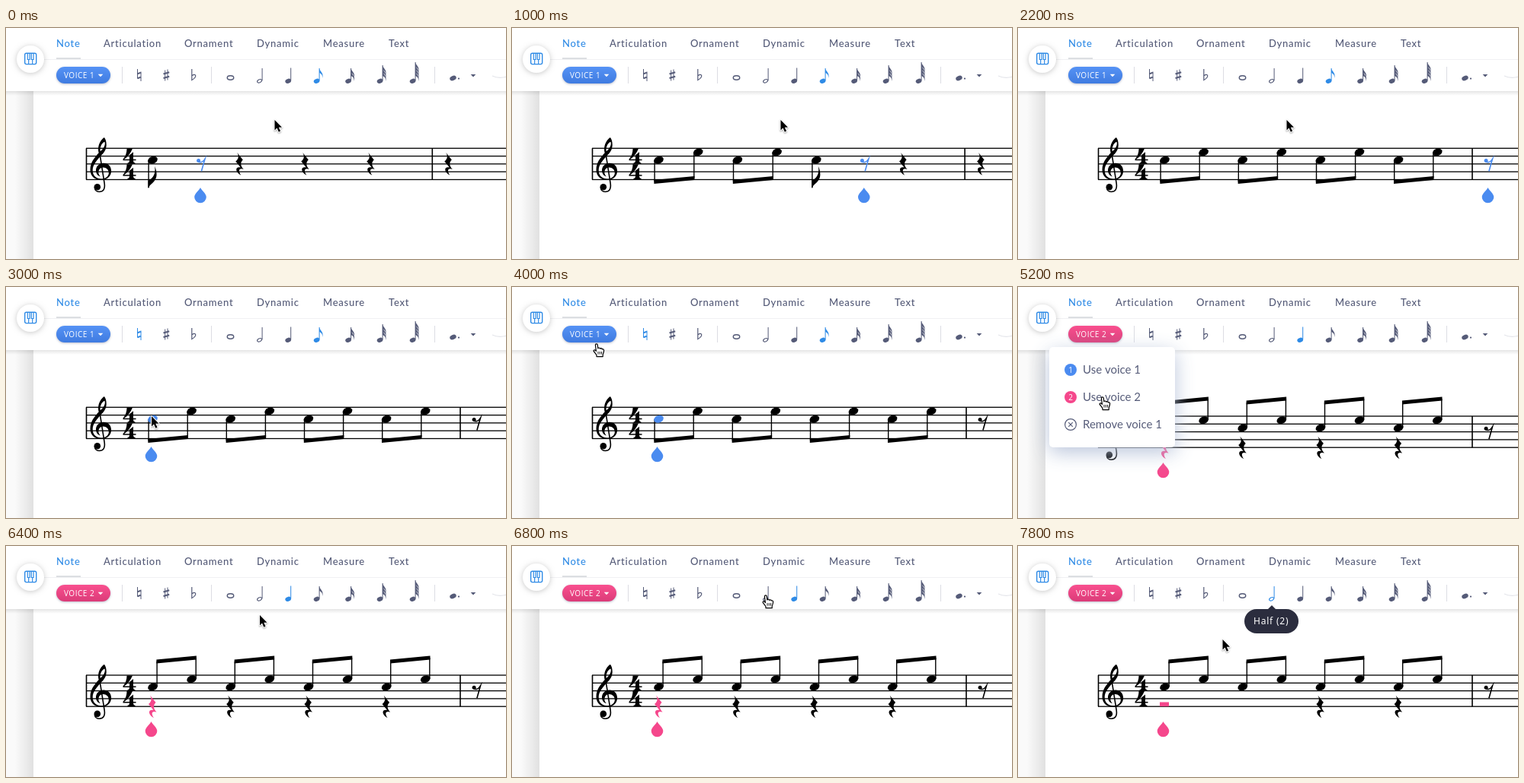
Animation of 656 by 304 pixels, one loop 8 s. Source, as an HTML page with a canvas:

```html
<!DOCTYPE html>
<html lang="en">
<head>
<meta charset="utf-8">
<title>Score editor</title>
<style>
  html, body { margin: 0; width: 100%; height: 100%; overflow: hidden; background: #fff; }
  canvas { display: block; width: 656px; height: 304px; }
</style>
</head>
<body>
<canvas id="stage" width="656" height="304"></canvas>
<script>
const ctx = document.getElementById('stage').getContext('2d');
const LOOP = 8000;
const BLUE = '#4a8bf0', PINK = '#f5478c', ACTIVE = '#2f8be6', GREY = '#555b78', INK = '#000';
const GAP = 10.3, FIRST_X = 192.5;

// Moments of the story, in ms
const NOTE_EVERY = 250, SELECT = 3000, MENU_OPEN = 4250, VOICE_TWO = 5200, TOOLTIP = 7000, HALF = 7300;

const POINTER = [
  [0, 352.5, 121], [2450, 352.5, 121], [2900, 191, 170], [3100, 191, 170], [3600, 111, 75],
  [4350, 111, 75], [4700, 111, 145], [5250, 111, 145], [5900, 333, 91], [6450, 333, 91],
  [6850, 333, 64], [7400, 333, 64], [7750, 268.5, 123], [LOOP, 268.5, 123]
];

const CLEF = new Path2D('M18.3-45.2C12.5-41 9-33 11.2-25C5-18 0-12 0-2.5C0 5.5 6 10.8 14 10.8' +
  'C22 10.8 27.6 6 27.6-1C27.6-7.5 23-11.5 17.5-11.5C11.5-11.5 7.5-7 7.5-2C7.5 2 9.5 5 13.2 6.2' +
  'C11 3.5 10.5 1.5 11-1C11.8-4 14-5.8 17-5.8C21-5.8 24.3-2.8 24.3 1.5C24.3 6 20 9.3 14.5 9.3' +
  'C8 9.3 3.2 5 3.2-2C3.2-9 8-14.5 13.5-20.5C18-25 21.2-29 21.2-35.5C21.2-39.5 20.2-43.5 18.3-45.2Z' +
  'M18.6-39.5C14.5-37 12.6-32.5 13.2-27C17-30 19.6-34 19.3-37.8C19.2-38.7 19-39.4 18.6-39.5Z');
const CLEF_TAIL = new Path2D('M12-27L18.6 15C19.8 23 17 26.3 12 26.3C9 26.3 6 24.5 6 21');
const FOUR = new Path2D('M5 0H12.5C10 6 6 11 1.5 14H8.5V8.5L13.5 4.5V14H17V15.5H13.5' +
  'C13.5 17.5 14.5 18.8 16 18.8V20H6V18.8C7.5 18.8 8.5 17.5 8.5 15.5H0V14C3.5 10 5 5 5 0Z');
const QUARTER_REST = new Path2D('M-3-15L4.5-5.5C1-2 1 2 5.5 7C0 5 -2.5 8 2 14.8C-6 10.5-6 3 1.5 4.5L-5-3.5C-.5-7-1-11-3-15Z');
const EIGHTH_REST = new Path2D('M-3.5-2.6C1-1 3-3 5.2-6.6L.6 9.6');
const FLAG_DOWN = new Path2D('M0 0V-9.5C3-10.5 11-15.5 8.5-28.5C13-18.5 11.5-11.5 6-6.5C3-4 1.5-2.5.6 0Z');
const FLAG_UP = new Path2D('M0 0C.5 4 6.5 6 4 13C4.4 9 3 7 0 6Z');
const DROP = new Path2D('M0 0C1.8 4 7.8 8 7.8 12.4A7.8 7.8 0 0 1-7.8 12.4C-7.8 8-1.8 4 0 0Z');
const ARROW = new Path2D('M0 0V13.4L3 10.6L5.3 15.8L7.6 14.8L5.3 9.7H9.5Z');
const HAND = new Path2D('M-1.6 1.2C-1.6-.6 1.1-.6 1.3 1.2L1.8 5.8C2.4 4.6 4.4 4.8 4.6 6.2C5.4 5.2 7 5.6 7.2 6.9' +
  'C8.4 6.2 9.7 7 9.6 8.6C9.5 11 8.6 12.6 8.2 14V16.6H0V14.6C-1.2 12.6-3 10.8-3.8 9.4C-4.4 8.2-2.8 7.2-1.6 8.3L-.6 9.4Z');
const HAND_LINES = new Path2D('M2 10V13.5M4.3 10V13.5M6.5 10V13.5');
const NATURAL = new Path2D('M172.5 54V66.5M177 57.5V70');
const NATURAL_BARS = new Path2D('M172.5 60.2L177 58.6M172.5 66.2L177 64.6');
const SHARP = new Path2D('M208.7 55.5V69.5M212 54.5V68.5');
const SHARP_BARS = new Path2D('M206.5 60.5L214.2 58.3M206.5 66L214.2 63.8');
const FLAT = new Path2D('M243.8 54V68.6C247 66.6 249 64.4 248.7 62.6C248.2 60.6 245.6 61.2 243.8 63');

function at(x, y, draw) {
  ctx.save();
  ctx.translate(x, y);
  draw();
  ctx.restore();
}
function fill(path, color, rule = 'nonzero') {
  ctx.fillStyle = color;
  ctx.fill(path, rule);
}
function stroke(path, color, width) {
  ctx.strokeStyle = color;
  ctx.lineWidth = width;
  ctx.stroke(path);
}
function rect(x, y, w, h, color) {
  ctx.fillStyle = color;
  ctx.fillRect(x, y, w, h);
}
function rounded(x, y, w, h, r) {
  const path = new Path2D();
  path.roundRect(x, y, w, h, r);
  return path;
}
function ellipse(x, y, rx, ry, tilt = 0) {
  const path = new Path2D();
  path.ellipse(x, y, rx, ry, tilt, 0, 7);
  return path;
}
function withShadow(color, blur, dy, draw) {
  ctx.save();
  ctx.shadowColor = color;
  ctx.shadowBlur = blur;
  ctx.shadowOffsetY = dy;
  draw();
  ctx.restore();
}
function text(str, x, y, font, color, spacing = 0) {
  ctx.font = font;
  ctx.letterSpacing = spacing + 'px';
  ctx.fillStyle = color;
  ctx.fillText(str, x, y);
}
function gradient(x0, y0, x1, y1, from, to) {
  const g = ctx.createLinearGradient(x0, y0, x1, y1);
  g.addColorStop(0, from);
  g.addColorStop(1, to);
  return g;
}
function caret(x, y, color) {
  fill(new Path2D(`M${x - 3.3} ${y}h6.6l-3.3 3.5z`), color);
}

// Score
function head(x, y, color = INK) {
  fill(ellipse(x, y, 6.5, 4.7, -0.36), color);
}
function quarterRest(x, y, color = INK) {
  at(x, y, () => fill(QUARTER_REST, color));
}
function eighthRest(x, y, color = INK) {
  at(x, y, () => {
    fill(ellipse(-3.2, -4.4, 2.5, 2.5), color);
    stroke(EIGHTH_REST, color, 1.6);
  });
}
function drop(x, y, color) {
  at(x, y, () => fill(DROP, color));
}
function barline(x, top) {
  rect(x - 0.8, top, 1.6, 4 * GAP, INK);
}
function staff(top) {
  for (let i = 0; i < 5; i++) rect(105, top + i * GAP - 0.65, 551, 1.3, INK);
  barline(105.5, top);
  at(110.5, top + 3 * GAP, () => {
    fill(CLEF, INK, 'evenodd');
    stroke(CLEF_TAIL, INK, 1.6);
    fill(ellipse(9.3, 20, 4.3, 4.3), INK);
  });
  at(153.5, top + 0.4, () => fill(FOUR, INK));
  at(153.5, top + 2 * GAP + 0.4, () => fill(FOUR, INK));
}
function notes(count, step, top, up, selected) {
  const noteX = i => FIRST_X + i * step;
  const noteY = i => top + (i % 2 ? 0.5 : 1.5) * GAP;
  const side = up ? 5.6 : -5.4;
  const beamY = up ? -18 : 44.2;
  for (let i = 0; i < count; i++) {
    const x = noteX(i) + side, y = noteY(i);
    const alone = i % 2 === 0 && i + 1 === count;
    const end = alone ? top + 52 : top + beamY - (i % 2) * 5;
    rect(x - 0.7, Math.min(y, end), 1.4, Math.abs(end - y), INK);
    if (alone) at(x - 0.6, end, () => fill(FLAG_DOWN, INK));
    if (i % 2) {
      const y0 = top + beamY - 2.6, left = noteX(i - 1) + side - 0.7;
      fill(new Path2D(`M${left} ${y0}L${x + 0.7} ${y0 - 5}v5.2L${left} ${y0 + 5.2}z`), INK);
    }
    head(noteX(i), y, selected && i === 0 ? BLUE : INK);
  }
}
function voiceOneScore(t) {
  const top = 158.3, mid = top + 2 * GAP, dropY = 210;
  const count = Math.min(8, 1 + Math.floor(t / NOTE_EVERY));
  const odd = count % 2, step = odd ? 51.7 : 51.1;
  const selected = t >= SELECT;
  staff(top);
  notes(count, step, top, false, selected);
  let x = FIRST_X + count * step, bar = 596;
  if (odd) {
    const restX = x - step + 63.3;
    eighthRest(restX, mid, BLUE);
    drop(restX - 0.8, dropY, BLUE);
    x = restX + 50.5;
  }
  for (let i = Math.ceil(count / 2); i < 4; i++, x += 86) {
    const current = !odd && i === count / 2;
    quarterRest(x, mid, current ? BLUE : INK);
    if (current) drop(x - 1, dropY, BLUE);
    bar = x + 81;
  }
  barline(bar, top);
  if (count < 8) return quarterRest(bar + 21, mid);
  eighthRest(bar + 21.3, mid, selected ? INK : BLUE);
  drop(selected ? 190.5 : 616.5, dropY, BLUE);
}
function voiceTwoScore(t) {
  const top = 170, restY = top + 4 * GAP + 0.3;
  const half = t >= HALF;
  staff(top);
  notes(8, 51.1, top, true, false);
  for (let i = half ? 2 : 0; i < 4; i++) quarterRest(FIRST_X - 0.5 + i * 102.2, restY, i ? INK : PINK);
  if (half) rect(186, 205.5, 12, 5.6, PINK);
  barline(596, top);
  eighthRest(617.3, top + 2 * GAP);
  drop(190.5, 231, PINK);
}

// Toolbar
function noteIcon(x, stemTop, flags, color, hollow) {
  if (hollow) stroke(ellipse(x - 3.4, 69.8, 3.2, 2, -0.5), color, 1.1);
  else fill(ellipse(x - 3.4, 69.8, 4, 2.9, -0.4), color);
  rect(x - 0.4, stemTop, 1, 69 - stemTop, color);
  for (let i = 0; i < flags; i++) at(x, stemTop + i * 4, () => fill(FLAG_UP, color));
}
function header(t) {
  const second = t >= VOICE_TWO;
  rect(0, 83, 656, 6, gradient(0, 83, 0, 89, 'rgba(0,0,0,.1)', 'rgba(0,0,0,0)'));
  rect(0, 0, 656, 83, '#fff');
  rect(50, 41, 606, 1, '#f0f1f3');
  rect(66, 39, 32, 2, '#dcdee2');
  const tabs = { Note: 66, Articulation: 128, Ornament: 234, Dynamic: 329, Measure: 416, Text: 502 };
  for (const name in tabs)
    text(name, tabs[name], 24.8, '500 13px Lato, sans-serif', name === 'Note' ? ACTIVE : GREY, 0.75);

  withShadow('rgba(0,0,0,.22)', 7, 1, () => fill(ellipse(32, 41, 18, 18), '#fff'));
  stroke(rounded(24.7, 33.2, 15, 14.4, 2), ACTIVE, 1.4);
  stroke(new Path2D('M28.3 33v8.5h2.8v-8.5M33.3 33v8.5h2.8v-8.5M29.7 41.5v6M34.7 41.5v6'), ACTIVE, 1.2);

  const pill = second ? gradient(0, 51, 0, 73, '#f9508f', '#db3b78') : gradient(0, 51, 0, 73, '#5592f5', '#3f7be0');
  withShadow('rgba(60,70,110,.35)', 3, 1, () => fill(rounded(66, 51, 71, 22, 11), pill));
  text(second ? 'VOICE 2' : 'VOICE 1', 76, 66, '10px "Open Sans", sans-serif', '#fff', 0.5);
  caret(124, 60.7, '#fff');
  for (const x of [152, 269, 562]) rect(x, 51, 1, 22, '#dcdde3');

  const natural = t >= SELECT && !second ? ACTIVE : GREY;
  stroke(NATURAL, natural, 1);
  stroke(NATURAL_BARS, natural, 2);
  stroke(SHARP, GREY, 1);
  stroke(SHARP_BARS, GREY, 2);
  stroke(FLAT, GREY, 1.2);

  const active = t >= HALF ? 'half' : second ? 'quarter' : 'eighth';
  const tint = name => name === active ? ACTIVE : GREY;
  stroke(ellipse(294.5, 65.5, 4.2, 2.7), GREY, 1.5);
  noteIcon(336, 53, 0, tint('half'), true);
  noteIcon(373.6, 52.5, 0, tint('quarter'));
  noteIcon(411, 53, 1, tint('eighth'));
  noteIcon(452.5, 53, 2, GREY);
  noteIcon(494, 49, 3, GREY);
  noteIcon(537, 45, 4, GREY);
  fill(ellipse(586.5, 66, 4.4, 3, -0.4), GREY);
  fill(ellipse(594, 66.6, 1.1, 1.1), GREY);
  caret(613, 61, GREY);
  stroke(new Path2D('M638 63Q646 67 658 64'), '#e4e5ea', 1.2);
}
function menu(opacity) {
  ctx.save();
  ctx.globalAlpha = opacity;
  withShadow('rgba(178,190,215,.9)', 26, 7, () => fill(rounded(41, 79, 165, 132, 5), '#fff'));
  ['Use voice 1', 'Use voice 2', 'Remove voice 1'].forEach((label, i) => {
    const y = 109 + 36 * i;
    text(label, 85, y + 5, '15px Lato, sans-serif', GREY);
    if (i < 2) {
      fill(ellipse(69, y, 8, 8), i ? PINK : BLUE);
      text(i + 1, 66.3, y + 3.6, '10px "Open Sans", sans-serif', '#fff');
    } else {
      stroke(ellipse(69, y, 7.4, 7.4), GREY, 1.2);
      stroke(new Path2D(`M66.2 ${y - 2.8}l5.6 5.6m0-5.6l-5.6 5.6`), GREY, 1.2);
    }
  });
  ctx.restore();
}
function tooltip(opacity) {
  ctx.save();
  ctx.globalAlpha = opacity;
  fill(new Path2D('M327 84L333 78L339 84Z'), '#2b2d3e');
  fill(rounded(297, 83, 71, 32, 16), '#2b2d3e');
  text('Half (2)', 309, 103.3, '12px "Noto Sans", sans-serif', '#fff', 0.8);
  ctx.restore();
}
function pointer(t) {
  const i = POINTER.findIndex(key => key[0] > t);
  const [t0, x0, y0] = POINTER[i - 1], [t1, x1, y1] = POINTER[i];
  const p = (t - t0) / (t1 - t0), ease = p * p * (3 - 2 * p);
  const hand = (t > 3500 && t < 5300) || (t > 6700 && t < 7450);
  at(x0 + (x1 - x0) * ease, y0 + (y1 - y0) * ease, () => {
    ctx.lineJoin = 'round';
    if (hand) {
      fill(HAND, '#fff');
      stroke(HAND, '#000', 1.2);
      stroke(HAND_LINES, '#000', 0.9);
    } else {
      withShadow('rgba(0,0,0,.35)', 2, 1, () => stroke(ARROW, '#fff', 2));
      fill(ARROW, '#000');
    }
  });
}

const ramp = (t, start, length) => Math.max(0, Math.min(1, (t - start) / length));

function draw(now) {
  const t = now % LOOP;
  rect(0, 0, 656, 304, '#fff');
  rect(0, 83, 36, 221, '#fafafa');
  rect(12, 83, 24, 221, gradient(12, 0, 36, 0, 'rgba(0,0,0,0)', 'rgba(0,0,0,.1)'));
  (t < VOICE_TWO ? voiceOneScore : voiceTwoScore)(t);
  header(t);
  const menuOpacity = ramp(t, MENU_OPEN, 200) - ramp(t, VOICE_TWO, 200);
  if (menuOpacity > 0) menu(menuOpacity);
  if (t > TOOLTIP) tooltip(ramp(t, TOOLTIP, 150));
  pointer(t);
}

const start = performance.now();
function frame() {
  draw(performance.now() - start);
  requestAnimationFrame(frame);
}
frame();
</script>
</body>
</html>
```
